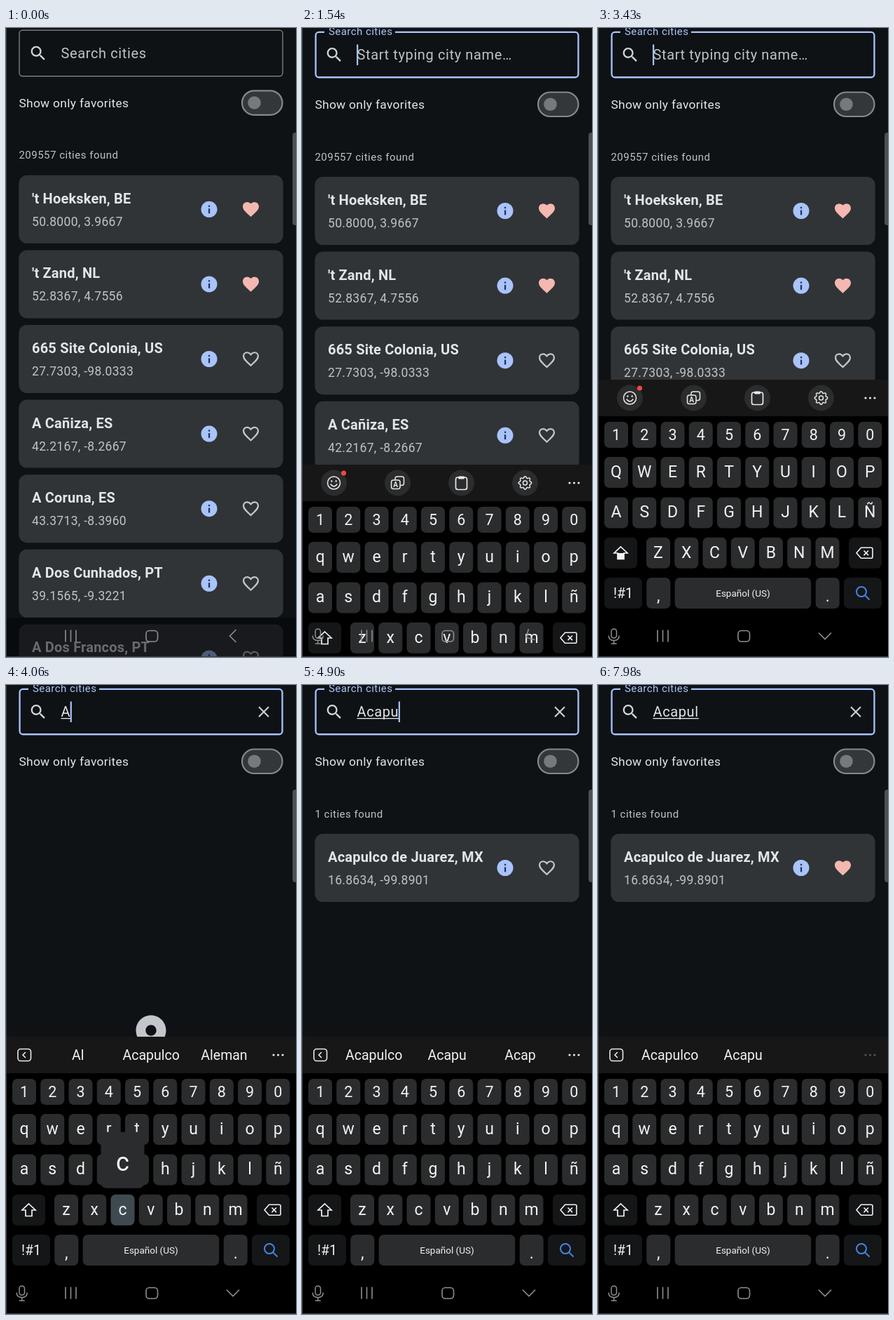
These frames come from a looping animation (414 px wide and 896 px high, 8000 ms). An HTML page with a canvas:

```html
<!DOCTYPE html>
<html lang="en">
<head>
<meta charset="utf-8">
<title>City search</title>
<style>
html, body { margin: 0; width: 100%; height: 100%; overflow: hidden; background: #0e1215; }
canvas { display: block; }
</style>
</head>
<body>
<canvas id="stage" width="414" height="896"></canvas>
<script>
const ctx = document.getElementById('stage').getContext('2d');
const LOOP = 8000, STEP = 70;
const BLUE = '#a9c3fb', PINK = '#f4b8b0', CARD = '#303437', KEY = '#2b2c2d', DARK_KEY = '#151617', PRESSED = '#3f4a50';
const BRIGHT = '#e3e5e8', SOFT = '#bfc3c7', NAV = '#8d8f91';

const SEARCH = new Path2D('M15.5 14h-.79l-.28-.27C15.41 12.59 16 11.11 16 9.5 16 5.91 13.09 3 9.5 3S3 5.91 3 9.5 5.91 16 9.5 16c1.61 0 3.09-.59 4.23-1.57l.27.28v.79l5 4.99L20.49 19l-4.99-5zm-6 0C7.01 14 5 11.99 5 9.5S7.01 5 9.5 5 14 7.01 14 9.5 11.99 14 9.5 14z');
const HEART = new Path2D('M12 21.35l-1.45-1.32C5.4 15.36 2 12.28 2 8.5 2 5.42 4.42 3 7.5 3c1.74 0 3.41.81 4.5 2.09C13.09 3.81 14.76 3 16.5 3 19.58 3 22 5.42 22 8.5c0 3.78-3.4 6.86-8.55 11.54z');
const PIN = new Path2D('M12 2C8.13 2 5 5.13 5 9c0 5.25 7 13 7 13s7-7.75 7-13c0-3.87-3.13-7-7-7zm0 9.5c-1.38 0-2.5-1.12-2.5-2.5s1.12-2.5 2.5-2.5 2.5 1.12 2.5 2.5-1.12 2.5-2.5 2.5z');

const START_LIST = { count: 209557, cities: [
  ["'t Hoeksken, BE", '50.8000, 3.9667', true],
  ["'t Zand, NL", '52.8367, 4.7556', true],
  ['665 Site Colonia, US', '27.7303, -98.0333'],
  ['A Cañiza, ES', '42.2167, -8.2667'],
  ['A Coruna, ES', '43.3713, -8.3960'],
  ['A Dos Cunhados, PT', '39.1565, -9.3221'],
  ['A Dos Francos, PT', '39.3236, -9.0475']] };
const ACA_LIST = { count: 43, cities: [
  ['Acacia Falls Mobile H…', '43.7456, -87.8142'],
  ['Acacia Ridge, AU', '-27.5833, 153.0333'],
  ['Acacias, CO', '3.9870, -73.7580']] };
const ACAP_LIST = { count: 8, cities: [
  ['Acapetahua, MX', '15.2819, -92.6892'],
  ['Acaponeta, MX', '22.4964, -105.3594'],
  ['Acapulco de Juarez, MX', '16.8634, -99.8901']] };
const ONE_LIST = { count: 1, cities: [['Acapulco de Juarez, MX', '16.8634, -99.8901']] };

// Each track holds [start time, value] pairs.
const LISTS = [[0, START_LIST], [3640, null], [4340, ACA_LIST], [4620, ACAP_LIST], [4900, ONE_LIST]];
const TYPED = [[0, ''], [3570, 'A'], [4130, 'Ac'], [4340, 'Aca'], [4550, 'Acap'], [4830, 'Acapu'], [5180, 'Acapul']];
const CURSOR = [[0, 0], [1330, 1], [1820, 0], [2310, 1], [2800, 0], [3290, 1], [5670, 0], [6230, 1], [6720, 0], [7210, 1], [7700, 0]];
const PRESSES = [[0, ''], [3150, 'shift'], [3290, ''], [3500, 'a'], [3640, ''], [4060, 'c'], [4200, ''], [4270, 'a'], [4410, ''],
  [4480, 'p'], [4620, ''], [4760, 'u'], [4900, ''], [5110, 'l'], [5250, '']];
const SUGGESTIONS = [[0, null], [3640, ['Al', 'Acapulco', 'Aleman']], [4200, ['Acapulco', 'Acapulco', 'Aca']],
  [4480, ['Acapulco', 'Acapu|lco', 'Aca']], [4620, ['Acapulco', 'Acapu', 'Acap']], [5390, ['Acapulco', 'Acapu', '']]];

const at = (track, t) => track.findLast(([start]) => start <= t)[1];
const progress = (t, from, to) => Math.min(1, Math.max(0, (t - from) / (to - from)));
const mix = (a, b, p) => a + (b - a) * p;

function text(str, x, y, size, color, { weight = 400, spacing = 0, align = 'left' } = {}) {
  ctx.font = `${weight} ${size}px Roboto, sans-serif`;
  ctx.letterSpacing = spacing + 'px';
  ctx.textAlign = align;
  ctx.fillStyle = color;
  ctx.fillText(str, x, y);
  return ctx.measureText(str).width;
}
function box(x, y, w, h, r, fill, stroke, width = 1.5) {
  ctx.beginPath();
  ctx.roundRect(x, y, w, h, r);
  paint(fill, stroke, width);
}
function disc(x, y, r, fill, stroke, width = 1.5) {
  ctx.beginPath();
  ctx.arc(x, y, r, 0, 7);
  paint(fill, stroke, width);
}
function paint(fill, stroke, width) {
  if (fill) { ctx.fillStyle = fill; ctx.fill(); }
  if (stroke) { ctx.strokeStyle = stroke; ctx.lineWidth = width; ctx.stroke(); }
}
function line(d, x, y, color, width = 1.6) {
  place(x, y, 1, () => {
    ctx.strokeStyle = color;
    ctx.lineWidth = width;
    ctx.stroke(new Path2D(d));
  });
}
function place(x, y, scale, draw) {
  ctx.save();
  ctx.translate(x, y);
  ctx.scale(scale, scale);
  draw();
  ctx.restore();
}
// Draws a 24-unit icon centred on x, y.
function icon(path, x, y, scale, color, outline) {
  place(x, y, scale, () => {
    ctx.translate(-12, -12);
    ctx.fillStyle = ctx.strokeStyle = color;
    if (!outline) return ctx.fill(path);
    ctx.clip(path);
    ctx.lineWidth = 3.8;
    ctx.stroke(path);
  });
}

function searchField(t) {
  const p = progress(t, 1120, 1330), typed = at(TYPED, t), focused = p > 0;
  const width = focused ? 2.3 : 1.2;
  box(18.4 + width / 2, 4.8 + width / 2, 377.2 - width, 66.6 - width, 4.6, null, focused ? BLUE : '#8b9094', width);
  if (p > 0.4) { ctx.fillStyle = '#0e1215'; ctx.fillRect(32, 3, 101, 5); }
  icon(SEARCH, 46, 38.3, 1.15, '#d2d5d8');
  text('Search cities', mix(78.5, 38, p), mix(45, 10, p), mix(20, 15, p), focused ? BLUE : SOFT, { spacing: mix(0.62, 0.45, p) });
  let end = 78;
  if (typed) {
    const typedWidth = text(typed, 78.5, 45, 20, BRIGHT, { spacing: 0.62 });
    ctx.fillRect(78.5, 47, typedWidth, 1.3);
    end += typedWidth;
    line('M-7-7L7 7M7-7L-7 7', 368, 38.3, '#d2d5d8', 2);
  } else if (p > 0.6) {
    ctx.globalAlpha = p;
    text('Start typing city name…', 78.5, 45, 20, SOFT, { spacing: 0.62 });
    ctx.globalAlpha = 1;
  }
  if (at(CURSOR, t)) { ctx.fillStyle = BLUE; ctx.fillRect(end, 23.5, 2.2, 29.5); }
}

function card([name, coords, liked], y, t) {
  box(18.4, y, 377.2, 97, 11.5, CARD);
  text(name, 37, y + 40, 20, BRIGHT, { weight: 700, spacing: 0.19 });
  text(coords, 37, y + 72, 17.5, SOFT, { spacing: 0.31 });
  disc(290, y + 48.5, 11.5, BLUE);
  ctx.fillStyle = '#23345a';
  ctx.fillRect(288.9, y + 42.8, 2.3, 2.3);
  ctx.fillRect(288.9, y + 47.4, 2.3, 6.9);
  const tapped = t >= 7350;
  if (t >= 7210 && t < 7910) {
    const fade = 1 - progress(t, 7420, 7910);
    disc(349.5, y + 48.5, 23 * progress(t, 7100, 7420), `rgba(230,232,235,${0.12 * fade})`);
  }
  icon(HEART, 349.5, y + 48.5, 1.15, liked || tapped ? PINK : '#c3c7cb', !(liked || tapped));
}

function app(t) {
  ctx.fillStyle = '#0e1215';
  ctx.fillRect(0, 0, 414, 896);
  place(0, mix(-2.2, 0, progress(t, 1120, 1330)), 1, () => {
    searchField(t);
    text('Show only favorites', 18.4, 115, 17.4, BRIGHT, { spacing: 0.3 });
    box(337, 91.5, 57.5, 34.5, 17.3, '#33373a', '#85898d', 2.2);
    disc(354.5, 108.7, 9.3, '#777a7d');
    const list = at(LISTS, t);
    if (list) {
      text(list.count + ' cities found', 18.4, 188.5, 15, SOFT, { spacing: 0.5 });
      list.cities.forEach((city, i) => card(city, 212 + i * 106.6, t));
    } else {
      icon(PIN, 207, 501.2, 3.07, '#c3c6ca');
    }
  });
  box(409, 149, 8, 132, 4, '#4c4f52');
}

function key(x, y, w, label, { h = 44, fill = KEY, size = 23, dy = 7 } = {}) {
  box(x, y, w, h, 7, fill);
  if (label) text(label, x + w / 2, y + h / 2 + dy, size, '#f2f2f2', { align: 'center' });
}

function toolbar(t) {
  ctx.fillStyle = '#171717';
  ctx.fillRect(0, 501, 414, 52);
  const words = at(SUGGESTIONS, t), white = '#e9e9e9';
  if (words) {
    box(17, 518.5, 18.5, 17, 4, null, white, 1.6);
    line('M2-4L-2 0L2 4', 26, 527, white);
    words.forEach((word, i) => {
      const [head, tail] = word.split('|'), x = 102.7 + i * 104.4;
      const width = text(head, x, 534, 19.5, '#f2f2f2', { align: 'center' });
      if (tail) text(tail, x + width / 2, 534, 19.5, '#3d3d3d');
    });
  } else {
    for (let i = 0; i < 4; i++) disc(45.5 + i * 91, 527, 18.5, KEY);
    disc(45.5, 527, 9, null, white);
    disc(42.3, 524.5, 1.2, white);
    disc(48.7, 524.5, 1.2, white);
    line('M-4.8 1.5Q0 8.5 4.8 1.5', 45.5, 527, white, 1.4);
    disc(59.5, 513, 3.6, '#f0483e');
    box(133, 518, 12.5, 12.5, 3, null, white);
    box(127.5, 523, 12.5, 12.5, 3, KEY, white);
    text('A', 133.7, 533, 10, white, { align: 'center', weight: 700 });
    box(219.5, 519, 16, 17.5, 3, null, white, 1.7);
    box(223, 517.5, 9, 4, 1.5, white);
    ctx.beginPath();
    for (let i = 0; i <= 96; i++) {
      const a = i / 96 * Math.PI * 2, r = 8.2 + 1.1 * Math.cos(8 * a);
      ctx.lineTo(318.5 + r * Math.cos(a), 527 + r * Math.sin(a));
    }
    paint(null, white, 1.5);
    disc(318.5, 527, 3, null, white);
  }
  for (const x of [382, 388.5, 395]) disc(x, 527, 1.6, t >= 5390 ? '#555' : white);
}

function keyboard(t) {
  const pressed = at(PRESSES, t), upper = t >= 3220 && t < 3640;
  const pitch = 40.25;
  let popup;
  ctx.fillStyle = '#000';
  ctx.fillRect(0, 501, 414, 540);
  toolbar(t);
  [...'1234567890'].forEach((d, i) => key(9 + i * pitch, 561, 34, d, { h: 37, size: 21.5 }));
  ['qwertyuiop', 'asdfghjklñ', 'zxcvbnm'].forEach((row, r) => [...row].forEach((c, i) => {
    const x = (r === 2 ? 69 : 9) + i * pitch, y = 611 + r * 57.4, label = upper ? c.toUpperCase() : c;
    const held = c === pressed;
    key(x, y, 34, label, { fill: held ? PRESSED : KEY });
    if (held) popup = { x: Math.min(343.3, Math.max(8, x - 14)), y: y - 89, label };
  }));
  key(9, 725.8, 47, '', { fill: pressed === 'shift' ? PRESSED : DARK_KEY });
  line('M0-9L9.5 0H4.5V8.5H-4.5V0H-9.5Z', 32.5, 748, '#f2f2f2', 1.7);
  if (upper) { ctx.fillStyle = '#f2f2f2'; ctx.fillRect(28, 748, 9, 8); }
  key(358, 725.8, 47, '', { fill: DARK_KEY });
  line('M-12 0L-5.5-7.5H9Q11-7.5 11-5.5V5.5Q11 7.5 9 7.5H-5.5ZM-1.5-3.3L5 3.3M5-3.3L-1.5 3.3', 381, 747.8, '#f2f2f2', 1.6);
  key(9, 783, 54, '!#1', { fill: DARK_KEY, size: 19.5 });
  key(69.3, 783, 34, ',', { dy: 12 });
  key(109.7, 783, 194.5, 'Español (US)', { size: 13.5, dy: 4.7 });
  key(310.7, 783, 34, '.', { dy: 12 });
  key(351, 783, 54, '', { fill: DARK_KEY });
  disc(376, 803, 7, null, '#4285e8', 2);
  line('M0 0L6.5 6.5', 381, 808, '#4285e8', 2);
  if (popup) {
    box(popup.x, popup.y, 62, 80, 8, KEY);
    text(popup.label, popup.x + 31, popup.y + 55, 36, '#fff', { align: 'center' });
  }
}

function navBar(t) {
  const open = t >= 1540;
  if (!open) {
    ctx.fillStyle = 'rgba(4,6,8,.55)';
    ctx.fillRect(0, 840, 414, 56);
  }
  line('M-7.5-8.5V8.5M0-8.5V8.5M7.5-8.5V8.5', 92.5, 866, NAV);
  box(200, 858.5, 16.5, 15.5, 4.5, null, NAV, 1.6);
  const turn = open ? progress(t, 1400, 1820) : 0;
  place(324, 866, 1, () => {
    ctx.rotate(-turn * Math.PI / 2);
    line('M4.5-9L-4.5 0L4.5 9', 0, 0, NAV);
  });
  if (open) {
    box(19, 856, 7.5, 13, 3.7, null, NAV);
    line('M-7.5-1Q-7.5 6 0 6Q7.5 6 7.5-1M0 6V10.5M-4 10.5H4', 22.7, 866.5, NAV, 1.5);
  }
}

function screenEdge() {
  ctx.fillStyle = '#3c3f41';
  ctx.fillRect(0, 0, 1, 896);
  ctx.fillRect(0, 895, 414, 1);
}

function render(now) {
  const t = Math.floor(now % LOOP / STEP) * STEP;
  app(t);
  if (t >= 1540) {
    const slide = 121 * (1 - progress(t, 1540, 1820)) ** 3;
    place(0, slide, 1, () => keyboard(t));
  }
  navBar(t);
  screenEdge();
}

const begin = performance.now();
(function frame() {
  render(performance.now() - begin);
  requestAnimationFrame(frame);
})();
</script>
</body>
</html>
```
